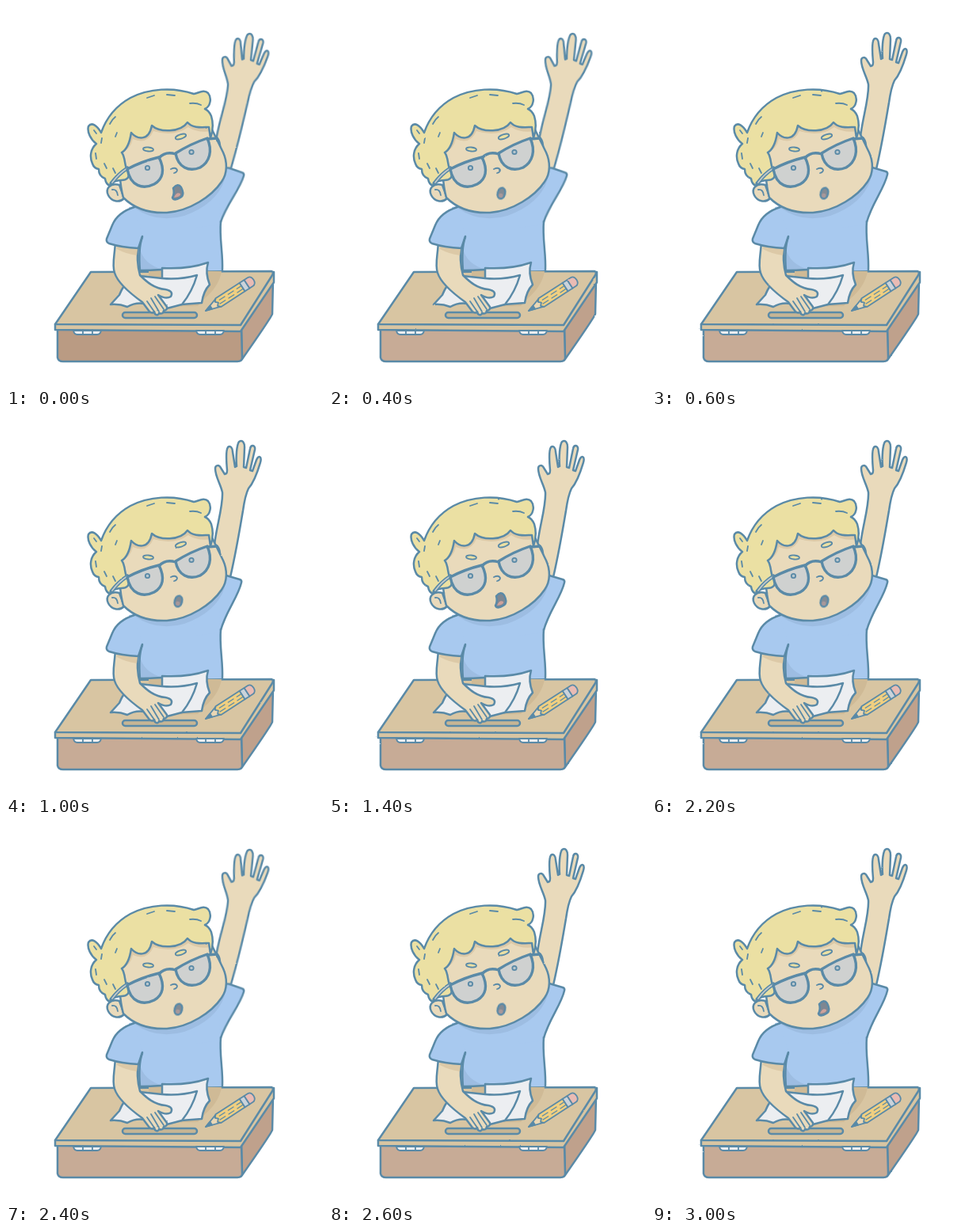
Animation of 400 by 480 pixels, one loop 3200 ms. Source, as an HTML page without scripts:

```html
<!DOCTYPE html>
<html lang="en">
<head>
<meta charset="utf-8">
<title>Raised hand</title>
<style>
  html, body { margin: 0; width: 100%; height: 100%; overflow: hidden; background: #fff; }
  svg { display: block; width: 100vw; height: 100vh; }
  .ink { stroke: #5a8aa7; stroke-width: 2.5; stroke-linecap: round; stroke-linejoin: round; }
  .thin { stroke-width: 1.8; }
  .line { fill: none; }
  .bare { stroke: none; }
  .skin { fill: #e9dabb; }
  .shade { fill: #dcc9a7; }
  .hair { fill: #ebe0a3; }
  .shirt { fill: #a8c9ef; }
  .fold { fill: #9dbde2; }
  .paper { fill: #eceef1; }
  .top { fill: #d8c5a2; }
  .front { fill: #c7ab96; }
  .side { fill: #bfa18c; }
  .lens { fill: #cfd1d0; }
  .rim { stroke-width: 3.4; }

  .arm, .sleeve, .wide, .small, .front { animation: 3.2s step-end infinite; }
  .arm { transform-origin: 285px 215px; animation-name: wave; }
  .sleeve { transform-origin: 268px 270px; animation-name: shrug; }
  .wide { animation-name: wide; }
  .small { animation-name: small; }
  .front { animation-name: tone; }

  @keyframes wave {
    0%, 12.5%, 25%, 75%, 87.5% { transform: rotate(3.5deg); }
    6.25%, 18.75%, 31.25%, 43.75%, 56.25%, 68.75%, 81.25%, 93.75%, 100% { transform: none; }
    37.5%, 50%, 62.5% { transform: translateY(-4.5px) rotate(-2.5deg); }
  }
  @keyframes shrug {
    0%, 12.5%, 25%, 75%, 87.5% { transform: rotate(3deg); }
    6.25%, 18.75%, 31.25%, 43.75%, 56.25%, 68.75%, 81.25%, 93.75%, 100% { transform: none; }
    37.5%, 50%, 62.5% { transform: rotate(-2deg); }
  }
  @keyframes wide {
    0%, 37.5%, 93.75% { opacity: 1; }
    12.5%, 68.75% { opacity: 0; }
  }
  @keyframes small {
    0%, 37.5%, 93.75% { opacity: 0; }
    12.5%, 68.75% { opacity: 1; }
  }
  @keyframes tone {
    0% { fill: #ba9b83; }
    6.25%, 100% { fill: #c7ab96; }
  }
</style>
</head>
<body>
<svg viewBox="0 0 400 480" role="img" aria-label="A boy at a desk raising his hand">
  <filter id="rough" filterUnits="userSpaceOnUse" x="0" y="0" width="400" height="480" color-interpolation-filters="sRGB">
    <feTurbulence type="fractalNoise" baseFrequency=".16" numOctaves="2" seed="1">
      <animate attributeName="seed" values="1;2;3;4" calcMode="discrete" dur="0.8s" repeatCount="indefinite"/>
    </feTurbulence>
    <feDisplacementMap in="SourceGraphic" scale="1.4" xChannelSelector="R" yChannelSelector="G"/>
  </filter>

  <g class="ink" filter="url(#rough)">
    <!-- raised arm -->
    <path class="arm skin" d="M261 212 L263 165 C266 140 274 116 273 99 C271 89 264 79 264 69 C264 64 269 64 271 68 L276 76 Q279 76 279 71 C278 60 277 46 280 42 C283 39 286 43 286 48 L289 67 L291 66 C290 55 291 39 294 35 C299 32 301 37 301 42 L300 67 L303 68 L308 44 C309 38 315 39 314 45 L308 71 L311 72 L316 58 C319 51 323 54 321 61 C318 71 314 85 306 94 C303 100 301 108 299 122 C294 152 289 180 283 206 Z"/>

    <!-- desk -->
    <path class="side" d="M297 409 L337 346 L336 389 Q335 393 298 446 Z"/>
    <path class="front" d="M65 408 V444 Q66 449 72 449 H292 Q298 449 298 444 L297 409 Z"/>
    <path class="top" d="M62 402 V409 L296 411 L338 349 V336 Z"/>
    <path class="top" d="M107 336 L335 335 Q338 336 336 340 L296 403 L62 402 Z"/>
    <g id="hinge" class="thin">
      <path class="paper" d="M85 410 H120 Q119 415 115 415 H90 Q86 415 85 410 Z M97 411 V414 M109 411 V414"/>
    </g>
    <use href="#hinge" x="155"/>
    <rect x="147" y="387" width="94" height="7" rx="3.5" fill="#c6b594"/>

    <!-- body -->
    <path class="shirt bare" d="M155 254 L262 235 L271 272 C270 294 274 310 273 334 H168 L166 306 Z"/>
    <path class="sleeve shirt" d="M258 204 L278 204 L295 209 Q298 210 297 213 C293 231 277 250 271 273 L250 268"/>
    <path class="shirt bare" d="M230 232 L269 246 L270 276 L240 280 Z"/>
    <path class="line" d="M271 272 C269 294 274 312 273 334"/>
    <path class="fold bare" d="M162 255 Q190 275 225 265 Q266 250 276 219 L200 240 Z"/>
    <path class="fold bare" d="M169 306 Q173 326 198 333 H169 Z"/>

    <!-- papers -->
    <path class="bare" fill="#cfba96" d="M180 334 L272 335 Q269 354 250 370 L242 379 L180 380 Z"/>
    <path class="paper" d="M197 331 Q229 333 255 324 Q251 337 257 352 Q249 360 247 375 L221 377 L197 345 Z"/>
    <path class="paper" d="M160 340 Q148 352 143 365 L132 377 Q143 376 153 380 Q163 374 175 376 L203 382 L222 377 Q235 361 241 340 Q220 346 197 344 Z"/>

    <!-- resting arm -->
    <path class="skin" d="M138 294 C138 313 133 326 137 337 C141 350 158 364 172 374 L181 386 Q185 389 187 386 L188 389 Q192 392 193 388 Q198 390 199 385 Q204 384 203 380 L192 365 Q202 371 208 367 Q212 360 201 358 C187 357 177 348 169 340 C165 326 165 315 167 300 Z"/>
    <path class="shade bare" d="M140 301 L166 307 L165 315 Q151 313 140 307 Z"/>
    <path class="line thin" d="M178 373 L187 386 M183 369 L193 386 M188 367 L199 383"/>
    <path class="shirt" d="M162 254 C146 259 138 267 134 277 L127 294 Q126 298 130 300 Q146 305 167 306 L172 291"/>
    <path class="line" d="M172 292 C167 305 168 321 169 334 Q182 334 196 333"/>

    <!-- pencil -->
    <g class="thin" transform="translate(252 385) rotate(-33)">
      <path fill="#ead7b5" d="M0 0 L19 -6 V6 Z"/>
      <path fill="#5a8aa7" d="M0 0 L8 -2.5 V2.5 Z"/>
      <path fill="#f0cf80" d="M19 -6.300 H55 V6.300 H19 L16 3 L19 0 L16 -3 Z"/>
      <path class="line" stroke-width="1.2" stroke-dasharray="8 5" d="M22 -2 H54 M20 2.400 H54"/>
      <rect fill="#cbd3da" x="55" y="-6.300" width="7" height="12.600"/>
      <path fill="#e9bbb4" d="M62 -6.300 H67 Q72 -6 72 0 T67 6.300 H62 Z"/>
    </g>

    <!-- head -->
    <path class="skin" d="M257 167 C263 162 269 166 270 176 L270 188 L258 183 Z"/>
    <path class="skin" d="M143 226 C131 223 125 231 129 239 C133 247 143 249 149 243 Z"/>
    <path class="line thin" d="M134 232 Q140 231 141 239"/>
    <path class="skin" d="M145 175 C141 200 144 227 148 242 C162 256 181 262 203 261 C232 259 260 240 272 222 C280 211 279 196 274 185 L257 150 L205 130 Z"/>
    <path class="shade bare" d="M147 184 Q157 181 160 168 Q178 176 186 158 Q212 166 230 153 Q242 161 260 158 L250 149 L200 142 L148 165 Z"/>
    <path class="hair" d="M120 160 C115 151 108 146 104 152 C102 159 107 169 114 174 C107 180 105 190 109 199 Q111 205 117 206 Q117 215 125 218 Q126 225 131 227 Q136 220 146 220 Q156 220 155 210 C148 203 152 193 146 185 Q155 180 158 160 C165 168 180 172 184 151 C194 160 220 160 229 147 C236 155 248 153 256 153 L258 167 Q263 152 259 139 Q256 132 251 130 C258 127 260 116 255 110 C250 105 243 110 237 111 C211 102 180 104 157 116 C137 127 126 143 120 160 Z"/>
    <path class="line thin" d="M131 149 Q134 143 138 140 M178 116 L187 113 M203 112 L213 113 M113 186 L114 193 M121 167 L120 173 M124 199 L127 205 M138 165 L140 160 M232 123 Q240 122 246 125 M111 157 L114 161 M135 205 L138 211"/>

    <!-- face -->
    <ellipse class="hair thin" cx="179.500" cy="181" rx="6.500" ry="2.500" transform="rotate(6 179.5 181)"/>
    <ellipse class="hair thin" cx="220.500" cy="165" rx="7" ry="2.700" transform="rotate(-18 220.5 165)"/>
    <path class="line" stroke-width="5" d="M153 205 Q142 212 133 224"/>
    <path class="line" stroke="#c5cbcb" stroke-width="1.600" d="M153 205 Q142 212 134 223"/>
    <path class="lens rim" d="M153 206 Q172 196 193 191 C201 207 198 219 187 225 C173 232 157 228 153 206 Z"/>
    <path class="lens rim" d="M214 186 Q233 174 254 167 C261 183 257 197 245 204 C231 210 217 204 214 186 Z"/>
    <path class="line rim" d="M193 192 Q201 183 214 187 M254 168 L266 167"/>
    <g class="thin" fill="#b9c7ce">
      <circle cx="178.500" cy="204.500" r="2.700"/>
      <circle cx="234" cy="184.500" r="2.700"/>
    </g>
    <path class="line thin" d="M208 206 Q214 203 216 207 Q216 210 212 211"/>
    <g class="wide">
      <path fill="#7e8792" d="M211 230 Q217 223 221 229 Q226 239 220 242 Q212 247 210 242 Q213 236 211 230 Z"/>
      <path class="bare" fill="#cfa29b" d="M212 242 Q215 234 220 237 Q221 241 212 242 Z"/>
    </g>
    <g class="small" transform="rotate(14 217.5 236.500)">
      <ellipse fill="#838b94" cx="217.500" cy="236.500" rx="4.700" ry="7"/>
      <ellipse class="bare" fill="#a9989a" cx="217.500" cy="239.500" rx="2.800" ry="2.800"/>
    </g>
  </g>
</svg>
</body>
</html>
```
